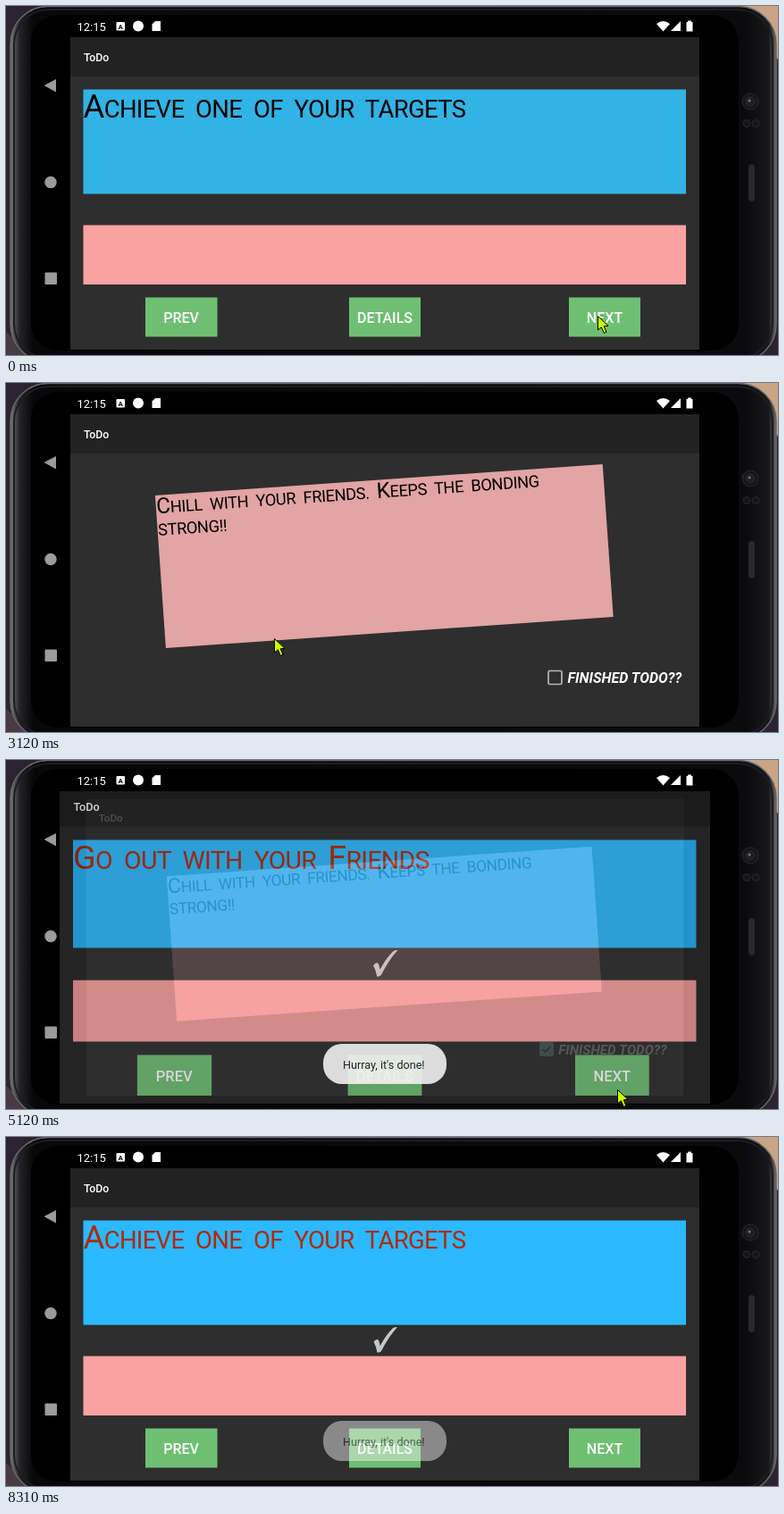
An HTML page that plays this animation: 864 by 391 pixels, repeating every 8410 ms.

```html
<!DOCTYPE html>
<html lang="en">
<head>
<meta charset="utf-8">
<title>ToDo app demo</title>
<style>
  html, body { margin: 0; width: 100%; height: 100%; overflow: hidden; background: #000; }
  svg { display: block; width: 864px; height: 391px; }
  text { font-family: Roboto, "Open Sans", sans-serif; fill: #fff; }
  .title { font-size: 12.3px; font-weight: 500; }
  .button rect { fill: #6fbf73; }
  .button text { font-size: 16px; font-weight: 500; text-anchor: middle; }
  .caps { fill: #000; letter-spacing: -.018em; word-spacing: .18em; }
  .caps tspan { font-size: .753em; text-transform: uppercase; }
  .headline { font-size: 36.5px; }
  .note { font-size: 24.3px; }
  .done .headline { fill: #b02a08; }
  .done #card { fill: #2cb9ff; }
  #tick { visibility: hidden; }
  .done #tick { visibility: visible; }
  #windows { isolation: isolate; }
</style>
</head>
<body>
<svg viewBox="0 0 864 391">
  <defs>
    <linearGradient id="rim" x2="1" y2="0">
      <stop offset="0" stop-color="#77777b"/>
      <stop offset=".012" stop-color="#242427"/>
      <stop offset=".03" stop-color="#08080a"/>
      <stop offset=".96" stop-color="#0b0b0d"/>
      <stop offset=".99" stop-color="#18181a"/>
      <stop offset="1" stop-color="#66666a"/>
    </linearGradient>
    <clipPath id="windowClip"><rect id="clipRect" y="35" height="350"/></clipPath>
  </defs>

  <!-- desktop and phone body -->
  <rect width="864" height="391" fill="#2b2430"/>
  <path d="M820 0H864V60Z" fill="#c9a585"/>
  <path d="M0 365L30 391H0Z" fill="#4a3a44"/>
  <rect x="5" y=".5" width="857" height="398" rx="42" fill="url(#rim)" stroke="#68686c" stroke-width="1.5"/>
  <rect x="9" y="4" width="849" height="391" rx="39" fill="none" stroke="#1d1d20" stroke-width="2"/>
  <rect x="28" y="10" width="792" height="376" rx="30"/>
  <g fill="#161618" stroke="#2b2b2d">
    <circle cx="833" cy="107" r="9"/>
    <circle cx="833" cy="107" r="5" fill="#202024"/>
    <circle cx="829" cy="131.500" r="4"/>
    <circle cx="839" cy="131.500" r="4"/>
    <rect x="831.500" y="177.500" width="6" height="41" rx="3" fill="#29292b"/>
  </g>
  <circle cx="832" cy="106" r="1.500" fill="#77777b"/>

  <!-- navigation keys -->
  <g fill="#9b9b9b">
    <path d="M42.500 89L56 82V96.500Z"/>
    <circle cx="50" cy="197.500" r="6.700"/>
    <rect x="43.500" y="298.500" width="13.500" height="13.500" rx="1"/>
  </g>

  <!-- status bar -->
  <g fill="#fff">
    <text x="79.500" y="27.500" font-size="13">12:15</text>
    <rect x="123.500" y="18" width="9.500" height="9.500" rx="1"/>
    <text x="128.200" y="25.700" font-size="8" font-weight="700" text-anchor="middle" style="fill:#000">A</text>
    <circle cx="148" cy="22.500" r="6"/>
    <path d="M167 17H173V28H163.500V20.500Z"/>
    <path d="M728 20Q735.500 14 743 20L735.500 28.500Z"/>
    <path d="M755 17V28H744Z"/>
    <path d="M763 16.500H767V18H768.500V28.500H761.500V18H763Z"/>
  </g>

  <g clip-path="url(#windowClip)">
  <g id="windows">
    <g id="list">
      <rect x="72" y="35" width="704" height="350" fill="#2e2e2e"/>
      <rect x="72" y="35" width="704" height="44" fill="#222"/>
      <text class="title" x="87" y="62">ToDo</text>
      <rect id="card" x="86.500" y="93.500" width="674.500" height="117" fill="#31b3e5"/>
      <text class="caps headline" id="targets" x="86.500" y="125">Achieve one of your targets</text>
      <text class="caps headline" id="friends" x="86.500" y="125">Go out with your Friends</text>
      <path id="tick" fill="#c6c6c6" d="M411.500 229.500Q414 226 416.500 227Q418 229 418.700 234Q425 222 433 214Q435.500 212.500 438 213Q428 224 420.500 239Q419 242 415.500 241.500Q414.500 235 411.500 229.500Z"/>
      <rect x="86.500" y="245.500" width="674.500" height="66.500" fill="#faa2a1"/>
      <g class="button"><rect x="156" y="326.500" width="80.500" height="44"/><text x="196" y="354.800">PREV</text></g>
      <g class="button"><rect x="384" y="326.500" width="80" height="44"/><text x="424" y="354.800">DETAILS</text></g>
      <g class="button"><rect x="630" y="326.500" width="80" height="44"/><text x="670" y="354.800">NEXT</text></g>
    </g>
    <g id="details">
      <rect x="72" y="35" width="704" height="350" fill="#2e2e2e"/>
      <rect x="72" y="35" width="704" height="44" fill="#222"/>
      <text class="title" x="87" y="62">ToDo</text>
      <g transform="translate(423.300 194) rotate(-4)">
        <rect x="-251" y="-85.700" width="502" height="171.400" fill="#e2a4a4"/>
        <text class="caps note" x="-250.500" y="-65.500">Chill with your friends. Keeps the bonding</text>
        <text class="caps note" x="-250.500" y="-40.500">strong!!</text>
      </g>
      <rect id="box" x="607" y="322.500" width="15" height="15" rx="1.500" fill="none" stroke="#b8b8b8" stroke-width="1.700"/>
      <path id="boxTick" d="M610 330L613.200 333.200L619 326.800" fill="none" stroke="#2e2e2e" stroke-width="1.800"/>
      <text x="628.500" y="336" font-size="16" font-weight="700" font-style="italic">FINISHED TODO??</text>
    </g>
  </g>
  </g>

  <g id="toast">
    <rect x="355" y="318" width="138" height="45" rx="21" fill="#f2f2f2" fill-opacity=".89"/>
    <text x="377" y="345.500" font-size="12.600" style="fill:#222">Hurray, it's done!</text>
  </g>

  <path id="cursor" d="M.5 .5V16L4.300 12.800L7.300 19.500L10 18.300L7.200 11.800L12 11.300Z" fill="#cf0" stroke="#000"/>
</svg>

<script>
const LOOP = 8410;
const el = id => document.getElementById(id);
const [list, details, targets, friends, box, boxTick, toast, cursor, clipRect] =
  ["list", "details", "targets", "friends", "box", "boxTick", "toast", "cursor", "clipRect"].map(el);

// Each track holds [time, ...values]; a value stays until the next entry.
const cursorTrack = [
  [0, 662, 347],
  [830, 600, 356], [950, 480, 360], [1100, 380, 358], [1220, 354, 355], [1370, 388, 349], [1650, 414, 345],
  [2580, 405, 340], [2730, 375, 325], [2850, 345, 308], [2970, 318, 294], [3120, 300, 286],
  [3270, 480, 322], [3390, 643, 360],
  [3670, 641, 357], [3790, 637, 351], [3940, 632, 343], [4060, 627, 336], [4180, 624, 332], [4330, 626, 333],
  [4730, 630, 336], [4880, 655, 351], [5000, 686, 369], [5120, 684, 369], [5270, 673, 366], [5420, 661, 363], [5540, 654, 361],
  [5660, 590, 368], [5780, 460, 367], [5930, 310, 359], [6050, 225, 348], [6170, 197, 343],
  [6710, 190, 348], [6830, 185, 352], [6980, 230, 341], [7100, 300, 325], [7220, 370, 312], [7370, 430, 303], [7520, 472, 298],
  [7640, -40, -40]
];
// list scale, list opacity, details scale, details opacity, side bleed
const windowTrack = [
  [0, 1, 1, 1, 0, 0],
  [2460, 1.034, .36, .949, .64, 14],
  [2580, 1, 0, .995, 1, 0],
  [2730, 1, 0, 1, 1, 0],
  [5000, 1.1, 1, .998, 1, 0],
  [5120, 1.034, .8, .95, .2, 14],
  [5270, 1.004, 1, 1, 0, 14],
  [5420, 1, 1, 1, 0, 0]
];
const toastTrack = [[0, 0], [5000, .52], [5120, 1], [8040, .9], [8180, .72], [8310, .52]];

const at = (track, t) => track.findLast(entry => entry[0] <= t).slice(1);
const show = (node, on) => node.style.display = on ? "" : "none";

function place(node, scale, opacity) {
  node.setAttribute("transform", `translate(424 210) scale(${scale}) translate(-424 -210)`);
  node.style.opacity = opacity;
}

function render(t) {
  const [listScale, listAlpha, detailScale, detailAlpha, bleed] = at(windowTrack, t);
  place(list, listScale, listAlpha);
  place(details, detailScale, detailAlpha);
  details.style.mixBlendMode = detailAlpha < 1 ? "plus-lighter" : "normal";
  clipRect.setAttribute("x", 72 - bleed);
  clipRect.setAttribute("width", 704 + 2 * bleed);

  const outing = t >= 430 && t < 6440;
  show(friends, outing);
  show(targets, !outing);
  list.classList.toggle("done", t >= 5000);

  const checked = t >= 4610;
  box.setAttribute("fill", checked ? "#80cbc4" : "none");
  box.setAttribute("stroke", checked ? "#80cbc4" : "#b8b8b8");
  show(boxTick, checked);

  toast.style.opacity = at(toastTrack, t)[0];
  cursor.setAttribute("transform", `translate(${at(cursorTrack, t)})`);
}

// Lower-case runs become small capitals.
for (const node of document.querySelectorAll(".caps"))
  node.innerHTML = node.textContent.replace(/[^A-Z]+/g, "<tspan>$&</tspan>");

const start = performance.now();
function tick() {
  render((performance.now() - start) % LOOP);
  requestAnimationFrame(tick);
}
tick();
</script>
</body>
</html>
```
